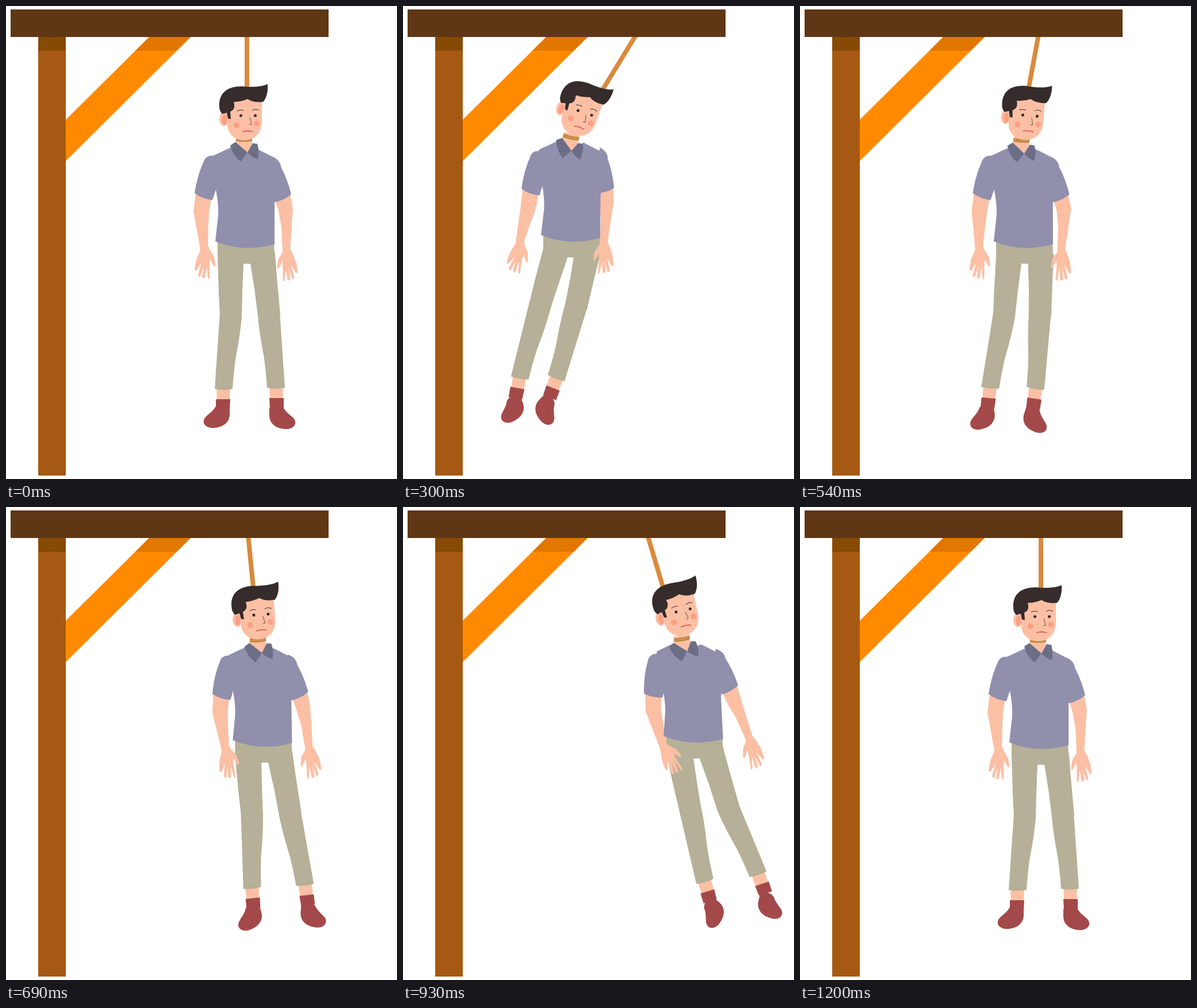
An HTML page with a canvas for the animation above (1.23 s loop, 680 by 824 pixels).

```html
<!DOCTYPE html>
<html lang="en">
<head>
<meta charset="utf-8">
<title>Swing</title>
<style>
html, body { margin: 0; width: 680px; height: 824px; overflow: hidden; background: #fff; }
canvas { display: block; }
</style>
</head>
<body>
<canvas id="stage" width="680" height="824"></canvas>
<script>
const ctx = document.getElementById('stage').getContext('2d');
const LOOP = 1230, STEP = 30;
const C = {
  skin: '#fbbfa4', blush: '#f99f85', hair: '#352c2b', shirt: '#908fac', collar: '#6c6e86',
  pants: '#b5b097', shoe: '#a44949', rope: '#d98a3d', band: '#bd8440', mouth: '#dd5b50'
};

// Offsets in px, angles in degrees; limbs run from the body outwards.
const rest = {
  body: [0, 0], chest: [0, 0, 0], head: [0, 0, 0], neck: [0, 0, 0], rope: [0],
  armL: [0, 0, 0], armR: [0, 0, 0], legL: [0, 0, 0], legR: [0, 0, 0]
};
const left = {
  body: [-124, -11], chest: [-123, -11, -3], head: [-104, -9, 19], neck: [-127, -3, 13], rope: [31.4],
  armL: [-1, 18, 9], armR: [8, 5, 4], legL: [16.6, 10, -22], legR: [18.4, 21, 45]
};
const leftRise = {
  body: [-78, -1], chest: [-77, -2, -4], head: [-63, -2, 11.3], neck: [-82, 4, 10], rope: [22],
  armL: [1, 11, 6], armR: [6, 8, 8], legL: [13, 13, -18], legR: [18, 22, 43]
};
const leftFall = {
  body: [-27, 0], chest: [-27.5, 0, 0], head: [-21, -1, 4.7], neck: [-30, 2, 3], rope: [10.5],
  armL: [0, 5, 0], armR: [0, 4.6, 4], legL: [5, 5.3, -10], legR: [7.3, 9, 18]
};
const rightRise = {
  body: [81, -10], chest: [75, -9, -4.6], head: [60, -7, -11.3], neck: [67, -3, -8], rope: [-15],
  armL: [-8.5, -10, -27], armR: [-4.5, -19, -8], legL: [-9.5, -15.4, -45], legR: [-9.5, -16.6, 11]
};
const rightFall = {
  body: [57, -6], chest: [52, -6, -4.8], head: [44, -7, -6.8], neck: [50, -5, -6], rope: [-10.5],
  armL: [-4.5, -8, -26], armR: [-2, -14.7, -6], legL: [-8.3, -10.8, -45], legR: [-8, -14, 14]
};
const blend = (a, b, k) => Object.fromEntries(
  Object.keys(a).map(name => [name, a[name].map((v, i) => v + (b[name][i] - v) * k)]));
const keys = [
  [0, rest], [180, leftRise], [300, left], [540, leftFall], [600, rest], [840, rightRise],
  [910, blend(rest, rightRise, 1.17)], [1050, rightFall], [1200, rest], [LOOP, rest]
];

function poseAt(t) {
  const i = keys.findIndex(([end]) => t < end);
  const [t0, a] = keys[i - 1], [t1, b] = keys[i];
  return blend(a, b, (t - t0) / (t1 - t0));
}

const rad = deg => deg * Math.PI / 180;
function fill(d, color) {
  ctx.fillStyle = color;
  ctx.fill(new Path2D(d));
}
function line(d, color, width) {
  ctx.strokeStyle = color;
  ctx.lineWidth = width;
  ctx.stroke(new Path2D(d));
}
function oval(x, y, rx, ry, color) {
  ctx.fillStyle = color;
  ctx.beginPath();
  ctx.ellipse(x, y, rx, ry, 0, 0, 2 * Math.PI);
  ctx.fill();
}
function mirrored(sum, dy, draw) {
  ctx.save();
  ctx.translate(sum, dy);
  ctx.scale(-1, 1);
  draw();
  ctx.restore();
}
// Draws a part turned about its pivot, with the pivot moved to a new spot.
function place([px, py], [x, y], deg, draw) {
  ctx.save();
  ctx.translate(x, y);
  ctx.rotate(rad(deg));
  ctx.translate(-px, -py);
  draw();
  ctx.restore();
}
function follow(p, pivot, to, deg) {
  const c = Math.cos(rad(deg)), s = Math.sin(rad(deg));
  const dx = p[0] - pivot[0], dy = p[1] - pivot[1];
  return [to[0] + dx * c - dy * s, to[1] + dx * s + dy * c];
}
function limb(start, joints, angles, draws) {
  let to = start;
  joints.forEach((joint, i) => {
    place(joint, to, angles[i], draws[i]);
    if (joints[i + 1]) to = follow(joints[i + 1], joint, to, angles[i]);
  });
}

function hand() {
  fill('M338 425L331 442L328 459Q329 463 332 460L340 447L334 468Q335 474 338 471L344 453' +
    'L341 472Q343 476 346 473L349 454L351 474Q353 477 354 474L354 450L355 441L361 453' +
    'Q364 455 364 450L362 437L354 424Q354 418 349 418L341 420Z', C.skin);
}
function shin() {
  fill('M366 660H390L389 688H367Z', C.skin);
  fill('M372 534L410 534L410 542C407 575 402 598 399 616Q396 638 394 667Q378 670 363 667Z', C.pants);
  fill('M365 685H390L389 703H365Z', C.shoe);
}
function shoe() {
  fill('M365 697Q378 688 389 698L389 712C388 727 376 735 358 735C345 734 340 724 347 716C353 710 360 706 365 697Z', C.shoe);
}

const armL = [
  () => {
    fill('M331 318L359 325L353 358Q340 364 326 358Z', C.skin);
    fill('M362 261C350 259 345 266 343 273C336 288 331 306 328 326Q341 336 359 338L365 320L378 290L372 264Z', C.shirt);
  },
  () => fill('M326 357Q340 348 353 357Q353 366 352 378L351 422L339 430Z', C.skin),
  hand
];
const armR = [
  () => {
    fill('M467 335L493 322L499 353Q487 362 474 357Z', C.skin);
    fill('M462 262C474 266 478 275 478 280C486 295 492 312 496 328Q485 338 467 342L458 300Z', C.shirt);
  },
  () => fill('M474 357Q486 346 499 352L498 366L494 428L481 428L479 385Z', C.skin),
  () => mirrored(835.5, 4, hand)
];
const legL = [
  () => fill('M368 434Q376 420 392 420L413 425L413 449L411 500L410 540Q391 547 372 538L370 500Z', C.pants),
  shin, shoe
];
const legR = [
  () => fill('M425 449L424 428L446 420Q466 420 468 432L471 472L477 537Q457 547 438 540L432 492Z', C.pants),
  () => mirrored(848, -2, shin),
  () => mirrored(847, 2, shoe)
];

function torso() {
  fill('M394 245L360 261L350 290L365 320Q370 345 369 365L364 410Q412 430 467 415L467 342L478 278' +
    'Q474 268 464 263L437 249L420 256Z', C.shirt);
}
function neck() {
  fill('M401 226H428V241L420 256L399 238Z', C.skin);
  fill('M399 237L390 243Q394 260 408 271L420 255Z', C.collar);
  fill('M420 255L429 239L437 240Q441 252 438 267Q428 264 420 255Z', C.collar);
  fill('M400 229Q414 231 428 229V235Q414 238 400 235Z', C.band);
  line('M401 232Q414 235 427 232', '#e0a862', 1);
}
function head() {
  oval(379, 197, 8, 12, C.skin);
  oval(380, 198, 4.5, 9, C.blush);
  fill('M383 170L396 158H445V200C445 222 432 234 414 234C398 234 385 222 385 207Z', C.skin);
  fill('M371 175C370 152 384 140 410 140C432 142 447 140 455 136C456 149 453 161 447 167' +
    'Q430 169 420 162Q409 167 396 167Q400 180 390 184L391 197L386 196L384 186L376 188Q371 183 371 175Z', C.hair);
  oval(408.5, 191, 2.5, 2.5, C.hair);
  oval(433.5, 191, 2.5, 2.5, C.hair);
  oval(401, 208, 5, 5, C.blush);
  oval(436.5, 205, 5, 5, C.blush);
  line('M402 183Q407 180 413 182M428 182Q434 178 440 182', C.hair, 1);
  line('M424 194L427 206L423 207', '#6a4a40', 1);
  line('M411 219Q420 216 429 219', C.mouth, 1.8);
}
function gallows() {
  fill('M249 54H321L104 270V198Z', '#ff8a00');
  fill('M249 54H321L297 78H225Z', '#e27700');
  fill('M56 54H104V818H56Z', '#a65912');
  fill('M56 54H104V78H56Z', '#874a04');
  fill('M8 6H561V54H8Z', '#5f3714');
}

const shift = ([x, y], [dx, dy]) => [x + dx, y + dy];

// The shirt slants so that its hem follows the hips and its top follows the chest.
function slantedTorso(hem, hemTo, chest, chestTo) {
  const height = chest[1] - hem[1];
  const slant = (chestTo[0] - chest[0] - hemTo[0] + hem[0]) / height;
  ctx.save();
  ctx.translate(...hemTo);
  ctx.transform(1, 0, slant, (chestTo[1] - hemTo[1]) / height, 0, 0);
  ctx.translate(-hem[0], -hem[1]);
  torso();
  ctx.restore();
}

function draw({ body, chest, head: headPose, neck: neckPose, rope, ...limbs }) {
  ctx.fillStyle = '#fff';
  ctx.fillRect(0, 0, 680, 824);
  place([419, 28], [419, 28], rope[0], () => fill('M415 28H423V168H415Z', C.rope));
  gallows();

  const hem = [411, 410], chestAt = [411, 275], nape = [420, 255], eye = [408, 191];
  const hipL = [390, 436], hipR = [446, 436];
  const shoulderL = [355, 280], shoulderR = [472, 285];
  const chestTo = shift(chestAt, chest);
  const onChest = p => follow(p, chestAt, chestTo, chest[2]);

  limb(shift(hipL, body), [hipL, [391, 538], [386, 706]], limbs.legL, legL);
  limb(shift(hipR, body), [hipR, [457, 538], [462, 706]], limbs.legR, legR);
  place([0, 0], body, 0, () => fill('M368 406H466L467 434L425 449H413L368 436Z', C.pants));
  limb(onChest(shoulderL), [shoulderL, [340, 357], [346, 426]], limbs.armL, armL);
  limb(onChest(shoulderR), [shoulderR, [487, 354], [488, 428]], limbs.armR, armR);
  slantedTorso(hem, shift(hem, body), chestAt, chestTo);
  place(nape, shift(nape, neckPose), neckPose[2], neck);
  place(eye, shift(eye, headPose), headPose[2], head);
}

function frame(now) {
  draw(poseAt(Math.floor(now % LOOP / STEP) * STEP));
  requestAnimationFrame(frame);
}
draw(rest);
requestAnimationFrame(frame);
</script>
</body>
</html>
```
